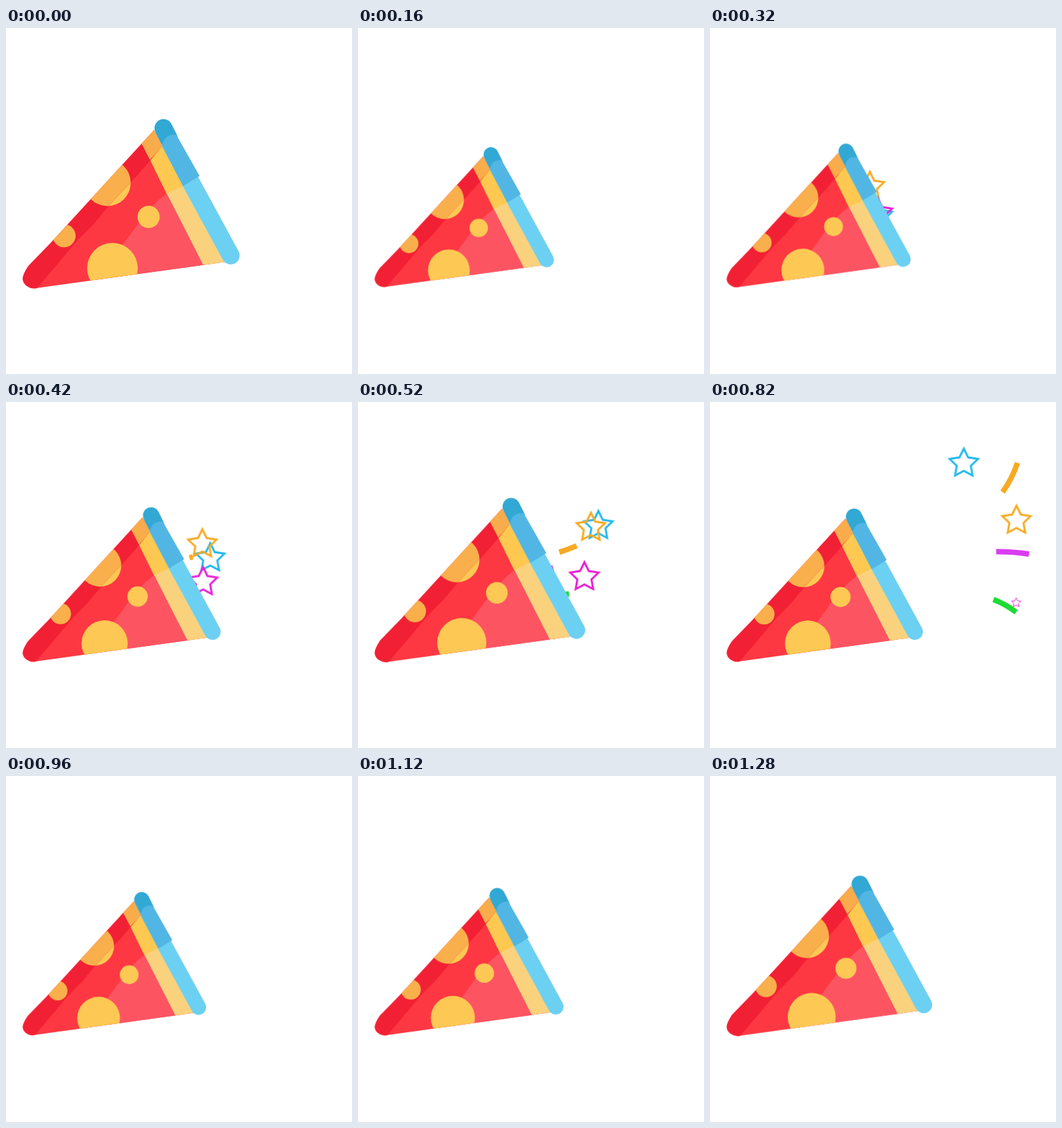
An HTML page for the animation above (1380 ms loop, 512 px wide and 512 px high).

```html
<!DOCTYPE html>
<html lang="en">
<head>
<meta charset="utf-8">
<title>Party popper</title>
<style>
html, body { margin: 0; width: 100%; height: 100%; overflow: hidden; background: #fff; }
svg { display: block; width: 100%; height: 100%; }

.cone, .star, .star path, .ribbon { animation: 1380ms linear infinite; }
.cone { transform-origin: 25px 374px; animation-name: squash; }
.star, .ribbon { fill: none; }
.star { stroke-width: 3; }
.ribbon { stroke-width: 8; animation-name: shoot; }
.star path { animation-name: shrink; }
.gold { stroke: #f7aa22; }
.sky { stroke: #22b8f0; }
.pink { stroke: #ea1fd6; }
.star.gold { animation-name: fly-gold; }
.star.sky { animation-name: fly-sky; }
.star.pink { animation-name: fly-pink; }
.star.pink path { animation-name: shrink-early; }

@keyframes squash {
  0%, 3.62% { transform: scale(1); animation-timing-function: cubic-bezier(.37,0,.63,1); }
  13.19%, 14.86% { transform: scale(.815); animation-timing-function: cubic-bezier(.37,0,.63,1); }
  43.84% { transform: scale(.988); animation-timing-function: cubic-bezier(.37,0,.63,1); }
  72.46% { transform: scale(.842); animation-timing-function: cubic-bezier(.4,0,.75,.8); }
  92.75%, 100% { transform: scale(.947); }
}
@keyframes fly-gold {
  0%, 18.84% { transform: translate(195px, 270px); }
  23.19% { transform: translate(236px, 235px); }
  37.68% { transform: translate(344px, 186px); }
  42.03% { transform: translate(380px, 180px); animation-timing-function: cubic-bezier(.3,.57,.6,1); }
  59.42%, 100% { transform: translate(453.5px, 175.5px); }
}
@keyframes fly-sky {
  0%, 18.84% { transform: translate(200px, 300px); }
  23.19% { transform: translate(248px, 279px); }
  37.68% { transform: translate(355.5px, 184px); }
  42.03% { transform: translate(367px, 142px); animation-timing-function: cubic-bezier(.25,.6,.6,.9); }
  59.42% { transform: translate(375.5px, 91px); }
  65.2%, 100% { transform: translate(376px, 86px); }
}
@keyframes fly-pink {
  0%, 18.84% { transform: translate(210px, 285px); }
  23.19% { transform: translate(248px, 274px); }
  37.68% { transform: translate(334.5px, 259px); }
  42.03% { transform: translate(365px, 261px); animation-timing-function: cubic-bezier(.3,.45,.6,.95); }
  59.42%, 100% { transform: translate(453px, 297px); }
}
@keyframes shrink {
  0%, 18.84% { transform: scale(0); }
  18.85%, 61.6% { transform: scale(1); }
  69.6%, 100% { transform: scale(0); }
}
@keyframes shrink-early {
  0%, 18.84% { transform: scale(0); }
  18.85%, 52.2% { transform: scale(1); }
  59.42% { transform: scale(.34); }
  61.6%, 100% { transform: scale(0); }
}
@keyframes shoot {
  0%, 29% { stroke-dasharray: 0 200; stroke-dashoffset: 0; }
  37.68% { stroke-dasharray: 11 200; stroke-dashoffset: -13; animation-timing-function: cubic-bezier(.3,.57,.6,1); }
  59.42% { stroke-dasharray: 20 200; stroke-dashoffset: -80; }
  66%, 100% { stroke-dasharray: 0 200; stroke-dashoffset: -100; }
}
</style>
</head>
<body>
<svg viewBox="0 0 512 512">
  <defs>
    <g id="spots">
      <circle cx="157.5" cy="355.5" r="37.5"/>
      <circle cx="211" cy="279.5" r="16.5"/>
      <circle cx="150" cy="229" r="34.5"/>
      <circle cx="86" cy="307.5" r="17"/>
    </g>
    <path id="side" d="M46 385Q38 387 31 382Q25 378 24.5 371Q25 364 33 352L66 318L219 151L232 173Q213 198 186 227Q152 262 130 290L106 314Z"/>
    <clipPath id="side-clip"><use href="#side"/></clipPath>
    <clipPath id="front-clip"><path d="M44 385L103 313L185 225L234 170L268 236L326 346Z"/></clipPath>
  </defs>

  <path class="ribbon gold" pathLength="100" d="M266 232Q422 190 455 90"/>
  <path class="ribbon" stroke="#d93cf0" pathLength="100" d="M232 266Q372 209 472 225"/>
  <path class="ribbon" stroke="#1ddb33" pathLength="100" d="M265 293Q390 262 453 311"/>
  <g class="star sky"><path/></g>
  <g class="star gold"><path/></g>
  <g class="star pink"><path/></g>

  <g class="cone">
    <g clip-path="url(#front-clip)">
      <path fill="#fe3842" d="M20 130h340v270H20z"/>
      <path fill="#fd5462" d="M238 245Q214 262 195 290T128 377L292 353L330 340Z"/>
      <use href="#spots" fill="#fdc854"/>
      <path fill="#ffc850" d="M213 195L234 170L270 230L238 246Z"/>
      <path fill="#fad27d" d="M238 245L270 229L332 348L292 351Z"/>
    </g>
    <use href="#side" fill="#f22034"/>
    <g clip-path="url(#side-clip)">
      <use href="#spots" fill="#f9af4c"/>
      <path fill="#f8ac4b" d="M200 170L219 149L234 173L213 195Z"/>
    </g>
    <g fill="none" stroke-width="26.5" stroke-linecap="round">
      <path stroke="#6cd0f2" d="M274 229L332.5 336.5"/>
      <path stroke="#32a8d4" d="M233 148L241 164"/>
    </g>
    <path fill="#52b6e4" d="M262 234L231 175Q233 157 252 158L286.500 219Z"/>
  </g>
</svg>
<script>
const outline = Array.from({ length: 10 }, (_, i) => {
  const r = i % 2 ? 11 : 22, a = i * Math.PI / 5;
  return `${(r * Math.sin(a)).toFixed(2)} ${(-r * Math.cos(a)).toFixed(2)}`;
});
for (const p of document.querySelectorAll('.star path')) p.setAttribute('d', `M${outline.join('L')}Z`);
</script>
</body>
</html>
```
